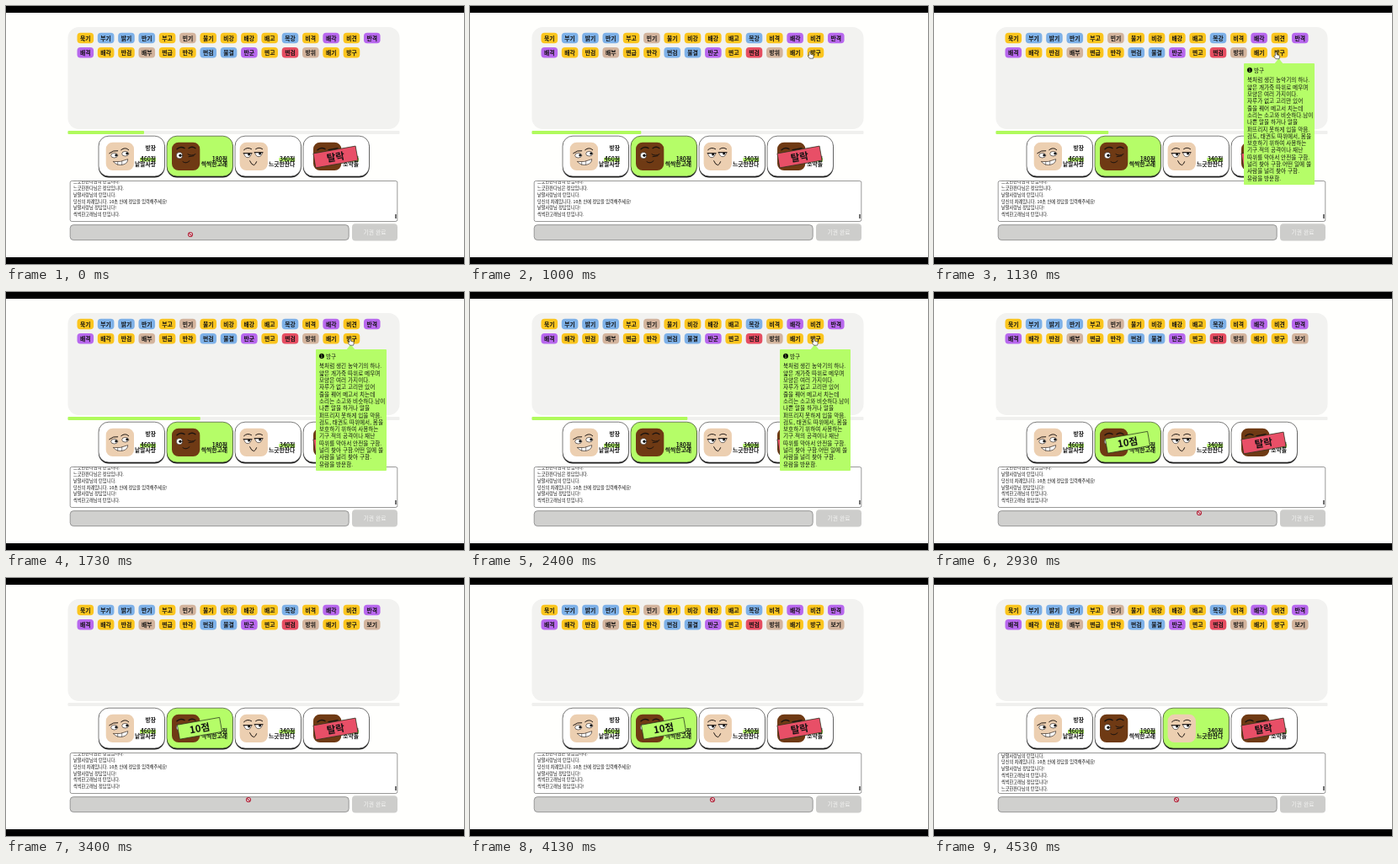
These frames come from a looping animation (544x306 px, 4590 ms). An HTML page:

```html
<!DOCTYPE html>
<html lang="ko">
<head>
<meta charset="utf-8">
<title>낱말 게임</title>
<style>
  html, body { margin: 0; width: 100%; height: 100%; overflow: hidden; background: #000; }
  svg { display: block; width: 100vw; height: 100vh; }
  text { font-family: "Noto Sans CJK KR", "Noto Sans CJK", sans-serif; font-size: 6.8px; fill: #111; }
  .bold { font-weight: 900; }
  .end { text-anchor: end; }
  .mid { text-anchor: middle; }
  .log text { font-size: 5.2px; }
  .tip text { font-size: 6.6px; }
  .card { stroke: #222; stroke-width: .6; }
  .face { fill: none; stroke: #1c1410; stroke-width: 1; stroke-linecap: round; }
  .white { fill: #fff; stroke-width: .6; }
  .ink { fill: #111; stroke: none; }
  .sticker rect { stroke: #26301c; stroke-width: .7; }
  .sticker text { font-size: 11.5px; }
</style>
</head>
<body>
<svg viewBox="0 0 544 306" preserveAspectRatio="none">
  <defs>
    <clipPath id="logClip"><rect x="77" y="207.8" width="387" height="47.2"/></clipPath>
  </defs>
  <rect width="544" height="306"/>
  <rect y="8" width="544" height="290" fill="#fffffd"/>
  <rect x="73.5" y="25" width="394" height="121" rx="13" fill="#f2f2f0"/>
  <g id="chips"></g>
  <rect x="73.5" y="148" width="394" height="4" rx="1" fill="#f0f0ee"/>
  <rect id="bar" x="73.5" y="148" height="4" rx="1" fill="#b0fa5c"/>
  <g id="cards"></g>

  <rect x="76.2" y="207.5" width="388.6" height="48" rx="2" fill="#fff" stroke="#555" stroke-width=".6"/>
  <g clip-path="url(#logClip)"><g id="log" class="log"></g></g>
  <rect x="462" y="247" width="1.8" height="5" fill="#666"/>
  <rect x="76.2" y="259.6" width="331" height="18" rx="4" fill="#d0d0ce" stroke="#777" stroke-width=".7"/>
  <rect x="411" y="258.2" width="54" height="20.4" rx="4" fill="#cdcdcb"/>
  <text class="mid" x="438" y="270.6" style="fill:#f4f4f2">기권 완료</text>

  <g id="tip" class="tip">
    <path d="M404 69l5.5-7 5.5 7z" fill="#b5fd68"/>
    <rect x="368" y="68" width="84" height="144" rx="1" fill="#b5fd68"/>
    <circle cx="375" cy="76" r="3"/>
    <text class="mid" x="375" y="77.8" style="font-size:5px;fill:#b5fd68">1</text>
    <text x="380" y="78.5" font-weight="500">방구</text>
  </g>

  <g id="hand">
    <path d="M-1.2 -3.2q1.2-1.2 1.8 0v2.4l2.8.8q1 .4.8 1.6l-.6 2.6h-4.2l-2.2-3.2q.2-1.2 1.6-.2z"
          fill="#fff" stroke="#222" stroke-width=".6"/>
  </g>
  <g id="arrow">
    <path d="M-1 -4v7.2l1.7-1.5 1.2 2.5 1.2-.6-1.1-2.4h2.3z" fill="#fff" stroke="#111" stroke-width=".6"/>
  </g>
  <g id="blocked">
    <circle r="2.5" fill="#eee" stroke="#b3263c" stroke-width="1.2"/>
    <path d="M-1.8-1.8l3.6 3.6" stroke="#b3263c" stroke-width="1.2"/>
  </g>
</svg>
<script>
const $ = id => document.getElementById(id);
const show = (el, on) => el.setAttribute("display", on ? "inline" : "none");
const add = (id, html) => $(id).insertAdjacentHTML("beforeend", html);
const LIME = "#b5fd68";

const chipColors = { y: "#fbc51e", b: "#7eb1e8", t: "#d3b49d", p: "#b868ee", r: "#e64e62" };
const chipRows = [
  "묵기y 부기b 밝기b 반기b 부고y 빈기t 불기y 비강y 배강y 배고y 복강b 비격y 배각p 비견y 반격p",
  "배격p 배각y 반검y 배부t 변급y 반각y 번검b 불결b 반군p 변고y 변검r 방위t 배기y 방구y 보기t"
];
chipRows.forEach((row, r) => row.split(" ").forEach((chip, i) => {
  const x = 94.3 + i * 24.32, y = 38 + r * 17.3;
  add("chips", `<g><rect x="${x - 9.8}" y="${y - 6.2}" width="19.6" height="12.4" rx="4" fill="${chipColors[chip[2]]}"/>
    <text class="bold mid" x="${x}" y="${y + 2.5}">${chip.slice(0, 2)}</text></g>`);
}));
const newChip = $("chips").lastElementChild;

const faces = [
  `<path d="M4 13q5-4 10-3M18 9q5-4 9 0"/>
   <ellipse class="white" cx="10" cy="15.5" rx="4" ry="2.8"/><ellipse class="white" cx="23" cy="13.5" rx="4" ry="2.8"/>
   <circle class="ink" cx="12" cy="15.3" r="1.4"/><circle class="ink" cx="25" cy="13.3" r="1.4"/>
   <path class="white" d="M9 23q8 1 17-3q0 5-6 6.500q-7 1.500-11-3.500z"/><path d="M14 23.500v3M19 22.500v4" stroke-width=".5"/>`,
  `<path d="M6 8q4-4 9-1M20 7q4-3 8 0" stroke-width="1.400"/>
   <circle class="white" cx="9" cy="15.500" r="3.700"/><circle class="ink" cx="10" cy="15.500" r="1.700"/>
   <path d="M19 14q4 3 9 0M20 17l6-1M13 23q4 3 8-1"/>`,
  `<path d="M5 9q4-4 9-1M19 8q4-3 8 0"/>
   <path class="white" d="M5 13h9q-1 5-4.500 5t-4.500-5zM18 12h9q-1 5-4.500 5t-4.500-5z"/>
   <path d="M4.500 13h10M17.500 12h10"/>
   <circle class="ink" cx="11" cy="14.300" r="1.500"/><circle class="ink" cx="24" cy="13.300" r="1.500"/>
   <path d="M12 22q2 5 5 5q2-1 3-4"/>`,
  `<path d="M5 9q4-4 9-1M18 9l11-2" stroke-width="1.400"/><path d="M20 11h8"/>`
];
const SKIN = "#eccfb1", BROWN = "#6f3a14";
const players = [
  { name: "낱말사랑", score: "460점", x: 110, avatar: 118.7, end: 178, skin: SKIN, host: true },
  { name: "씩씩한고래", score: "180점", x: 191, avatar: 197, end: 263, skin: BROWN },
  { name: "느긋한판다", score: "340점", x: 272, avatar: 277.6, end: 343.3, skin: SKIN },
  { name: "조약돌", score: "0점", x: 353, avatar: 365, end: 419, skin: BROWN }
];
const sticker = (x, y, color, label, id) => `<g id="${id}" class="sticker" transform="translate(${x} ${y}) rotate(-10)">
  <rect x="-25.5" y="-8.6" width="51" height="17.2" fill="${color}"/>
  <text class="bold mid" y="4.200">${label}</text></g>`;

players.forEach((p, i) => add("cards", `
  <rect x="${p.x}" y="155" width="78.500" height="48.600" rx="12" fill="#1d1d1d"/>
  <rect id="card${i}" class="card" x="${p.x}" y="154.200" width="78.500" height="47.800" rx="12"/>
  <rect x="${p.avatar}" y="161.700" width="33.300" height="33.300" rx="8" fill="${p.skin}"/>
  <g class="face" transform="translate(${p.avatar} 161.700)">${faces[i]}</g>
  ${p.host ? `<text class="bold end" x="${p.end}" y="170.500">방장</text>` : ""}
  <rect x="${p.end - (i < 3 ? 19 : 10)}" y="180" width="${i < 3 ? 19 : 10}" height="4.500" fill="${LIME}"/>
  <text id="score${i}" class="bold end" x="${p.end}" y="183.800">${p.score}</text>
  <text class="bold end" x="${p.end}" y="190.300">${p.name}</text>`));
add("cards", sticker(391.5, 179, "#e84f67", "탈락", "out") + sticker(230, 178.3, LIME, "10점", "gain"));

const [first, second, third] = players.map(p => p.name);
const LINE = 7.85;
[`${third}님의 턴입니다.`, `${third}님은 정답입니다.`, `${first}님의 턴입니다.`,
 "당신의 차례입니다. 10초 안에 정답을 입력해주세요!", `${first}님 정답입니다!`,
 `${second}님의 턴입니다.`, `${second}님 정답입니다!`, `${third}님의 턴입니다.`]
  .forEach((line, i) => add("log", `<text x="80" y="${210 + i * LINE}">${line}</text>`));
const logLines = [...$("log").children];

["북처럼 생긴 농악기의 하나.", "얇은 개가죽 따위로 메우며", "모양은 여러 가지이다.", "자루가 없고 고리만 있어",
 "줄을 꿰어 메고서 치는데", "소리는 소고와 비슷하다.남이", "나쁜 말을 하거나 말을", "퍼뜨리지 못하게 입을 막음.",
 "검도, 태권도 따위에서, 몸을", "보호하기 위하여 사용하는", "기구.적의 공격이나 재난", "따위를 막아서 안전을 구함.",
 "널리 찾아 구함.어떤 일에 쓸", "사람을 널리 찾아 구함.", "유람을 방문함."]
  .forEach((line, i) => add("tip", `<text x="372" y="${90.4 + i * 8.3}">${line}</text>`));

// Pointer stops: step, x, y, shape
const stops = [
  [0, 219, 271, "blocked"], [6, 219, 271, "blocked"], [7, 300, 190, "arrow"], [8, 440, 40, "arrow"],
  [10, 404, 58, "hand"], [12, 409, 59, "hand"], [26, 409, 59, "hand"], [27, 396, 150, "arrow"],
  [28, 362, 255, "arrow"], [29, 315, 262, "blocked"], [30, 288, 263, "blocked"], [46, 288, 263, "blocked"]
];
function pointerAt(step) {
  const i = stops.findIndex(s => s[0] > step) - 1;
  const a = stops[i], b = stops[i + 1], k = (step - a[0]) / (b[0] - a[0]);
  return { x: a[1] + (b[1] - a[1]) * k, y: a[2] + (b[2] - a[2]) * k, shape: a[3] };
}

const LOOP = 4590, ANSWER = 26, NEXT_TURN = 45;

function draw(time) {
  // Steps alternate between 130 and 70 ms.
  const t = time % LOOP;
  const step = 2 * Math.floor(t / 200) + (t % 200 >= 130 ? 1 : 0);
  const answered = step >= ANSWER, passed = step >= NEXT_TURN;

  show($("bar"), !answered);
  $("bar").setAttribute("width", 90.5 + 3.93 * step);
  show(newChip, answered);
  show($("gain"), answered && !passed);
  show($("tip"), step >= 11 && step < 29);
  players.forEach((p, i) => $("card" + i).setAttribute("fill", i === (passed ? 2 : 1) ? LIME : "#fff"));
  $("score1").textContent = answered ? "190점" : "180점";

  const scroll = passed ? 1.67 : step === ANSWER ? .67 : answered ? 1 : 0;
  $("log").setAttribute("transform", `translate(0 ${-scroll * LINE})`);
  show(logLines[6], answered);
  show(logLines[7], passed);

  const pointer = pointerAt(step);
  for (const shape of ["hand", "arrow", "blocked"]) {
    show($(shape), shape === pointer.shape);
    $(shape).setAttribute("transform", `translate(${pointer.x} ${pointer.y})`);
  }
}

function tick() {
  draw(performance.now());
  requestAnimationFrame(tick);
}
tick();
</script>
</body>
</html>
```
